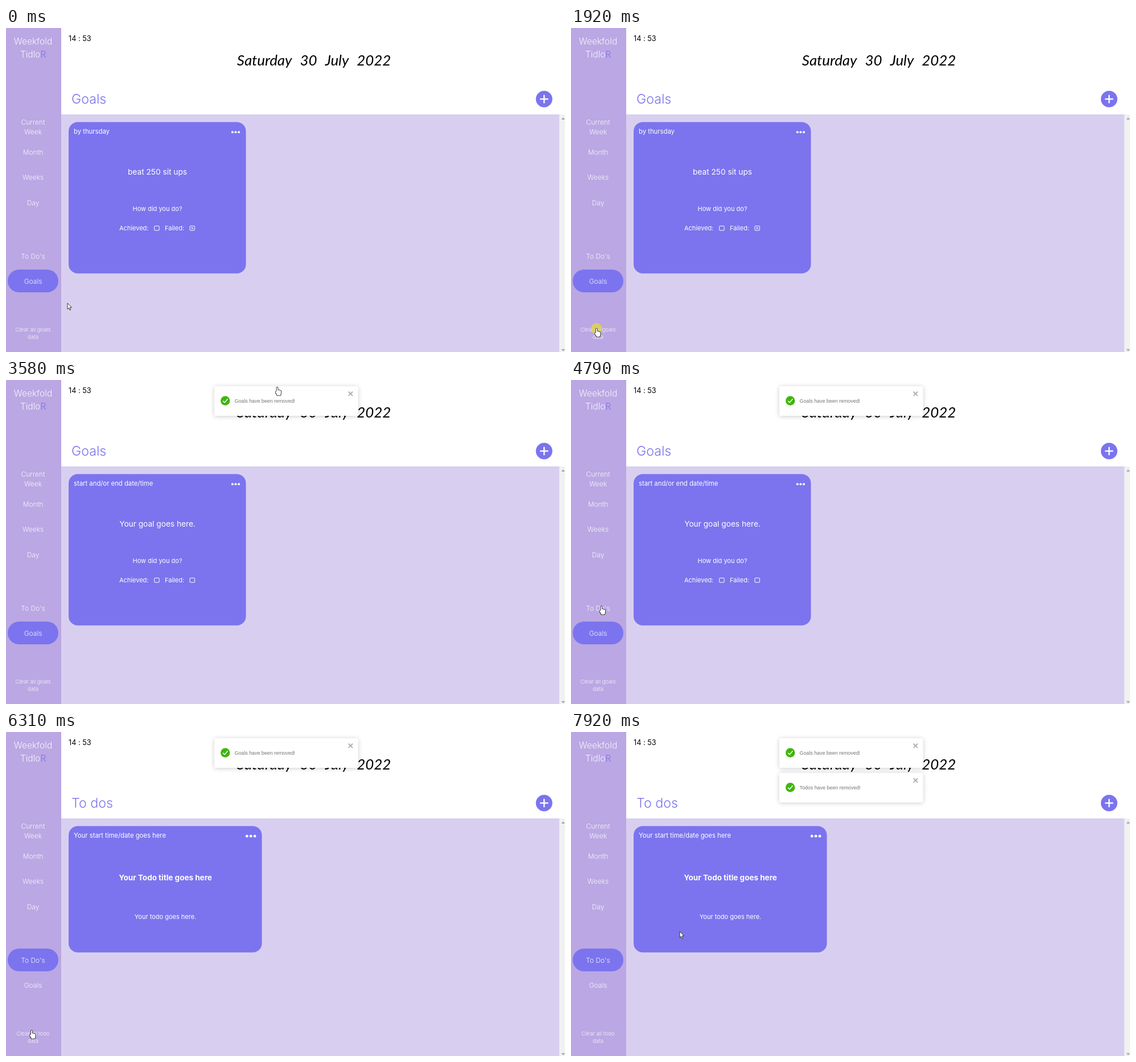
An HTML page with a canvas that plays this animation: 982x570 px, repeating every 8000 ms.

```html
<!DOCTYPE html>
<html lang="en">
<head>
<meta charset="utf-8">
<title>Goals and to dos</title>
<style>
html, body { margin: 0; width: 100%; height: 100%; overflow: hidden; background: #fff; }
canvas { display: block; }
</style>
</head>
<body>
<canvas id="stage" width="982" height="570"></canvas>
<script>
const ctx = document.getElementById('stage').getContext('2d');
const LOOP = 8000;
const ACCENT = '#7b74ee', SIDEBAR = '#baa7e3', PANEL = '#d8cff0', PALE = '#f7f3fd';
const SANS = 'Inter, sans-serif';
const TODO_PAGE = 5180;
const PRESSES = [
  { down: 1920, up: 2190 },
  { down: 5120, up: TODO_PAGE },
  { down: 6050, up: 6310 }
];
const GOALS_CLEARED = PRESSES[0].up, TODOS_CLEARED = PRESSES[2].up;
const TOASTS = [
  { start: 2530, y: 11, text: 'Goals have been removed!' },
  { start: 6450, y: 72, text: 'Todos have been removed!' }
];
// Each move glides the pointer to a stop along an arc; bend sets how far it bows out.
const HOME = { x: 108, y: 484 };
const MOVES = [
  { start: 210, end: 780, x: 5, y: 505, bend: 0.85 },
  { start: 780, end: 1050, x: 65, y: 534, bend: 0.2 },
  { start: 1110, end: 1520, x: 45, y: 529, bend: 0.5 },
  { start: 2470, end: 3310, x: 515, y: 18, bend: 0 },
  { start: 3320, end: 3580, x: 476.5, y: 13, bend: 0 },
  { start: 3650, end: 4120, x: 277, y: 255, bend: 0 },
  { start: 4140, end: 4790, x: 53.5, y: 398.5, bend: 0.15 },
  { start: 5320, end: 5910, x: 45, y: 525.5, bend: -0.6 },
  { start: 6400, end: 7050, x: 539, y: 22, bend: -0.06 },
  { start: 7200, end: 7920, x: 191, y: 351, bend: 0.13 }
];

const clamp = v => Math.max(0, Math.min(1, v));
const glide = v => (1 - Math.cos(Math.PI * v)) / 2;

function text(str, x, y, size, { weight = 400, color = '#fff', align = 'left', family = SANS, style = '' } = {}) {
  ctx.font = `${style} ${weight} ${size}px ${family}`;
  ctx.textAlign = align;
  ctx.fillStyle = color;
  ctx.fillText(str, x, y);
}

function rect(x, y, w, h, color) {
  ctx.fillStyle = color;
  ctx.fillRect(x, y, w, h);
}

function round(x, y, w, h, r, color) {
  ctx.beginPath();
  ctx.roundRect(x, y, w, h, r);
  ctx.fillStyle = color;
  ctx.fill();
}

function disc(x, y, r, color) {
  ctx.beginPath();
  ctx.arc(x, y, r, 0, Math.PI * 2);
  ctx.fillStyle = color;
  ctx.fill();
}

function line(points, color, width) {
  ctx.beginPath();
  points.forEach(([x, y]) => ctx.lineTo(x, y));
  ctx.strokeStyle = color;
  ctx.lineWidth = width;
  ctx.stroke();
}

function cross(x, y, r, color, width) {
  line([[x - r, y - r], [x + r, y + r]], color, width);
  line([[x - r, y + r], [x + r, y - r]], color, width);
}

function drawSidebar(todo) {
  const light = { weight: 300, color: PALE };
  const centered = { ...light, align: 'center' };
  const stack = (labels, y, step, size) =>
    labels.forEach((label, i) => text(label, 47.5, y + i * step, size, centered));

  rect(0, 0, 97, 570, SIDEBAR);
  text('Weekfold', 47.5, 29, 15.5, centered);
  text('Tidlo', 60.5, 52, 15.5, { ...light, align: 'right' });
  text('R', 60.5, 52, 15.5, { ...light, color: ACCENT });

  round(3, todo ? 381 : 425, 89, 40, 20, ACCENT);
  stack(['Current', 'Week'], 169.5, 17.5, 12);
  stack(['Month', 'Weeks', 'Day'], 222.5, 44.7, 12);
  stack(["To Do's", 'Goals'], 406, 44, 12);
  stack([`Clear all ${todo ? 'todo' : 'goals'}`, 'data'], 534, 13, 9.5);
}

function drawScrollArrow(y, dir) {
  ctx.beginPath();
  ctx.moveTo(975.5, y);
  ctx.lineTo(982, y);
  ctx.lineTo(978.8, y + 3.5 * dir);
  ctx.fillStyle = '#a3a3a3';
  ctx.fill();
}

function drawPage(todo) {
  rect(0, 0, 982, 570, '#fff');
  rect(97, 152, 875, 418, PANEL);
  rect(972, 152, 10, 418, '#f1f1f1');
  drawScrollArrow(161, -1);
  drawScrollArrow(565, 1);

  text('14 : 53', 110, 22.5, 12.7, { color: '#000' });
  ctx.wordSpacing = '8px';
  text('Saturday 30 July 2022', 541, 65.5, 25.8,
    { color: '#000', align: 'center', family: 'Lato, sans-serif', style: 'italic' });
  ctx.wordSpacing = '0px';

  text(todo ? 'To dos' : 'Goals', 115, 133, 23.2, { weight: 300, color: ACCENT });
  disc(945.3, 125, 14.5, ACCENT);
  line([[938, 125], [952.6, 125]], '#fff', 2.4);
  line([[945.3, 117.7], [945.3, 132.3]], '#fff', 2.4);
}

function drawCard(w, h, label, dotGap, dotSize) {
  round(110, 165.5, w, h, 16, ACCENT);
  text(label, 119, 186.3, 11.3);
  for (let i = 0; i < 3; i++) disc(110 + w - 12.5 - i * dotGap, 183.2, dotSize, '#fff');
}

function checkbox(x, checked) {
  ctx.beginPath();
  ctx.roundRect(x, 348.3, 8.4, 7.8, 1);
  ctx.strokeStyle = '#fff';
  ctx.lineWidth = 1;
  ctx.stroke();
  if (checked) cross(x + 4.2, 352.2, 1.8, '#fff', 1);
}

function drawGoal(cleared) {
  const mid = { align: 'center' };
  drawCard(311.5, 266.3, cleared ? 'start and/or end date/time' : 'by thursday', 5.6, 2);
  text(cleared ? 'Your goal goes here.' : 'beat 250 sit ups', 266, 258, 13.7, mid);
  text('How did you do?', 266, 322, 11, mid);
  text('Achieved:', 199, 356, 11);
  text('Failed:', 279, 356, 11);
  checkbox(260.7, false);
  checkbox(323, !cleared);
}

function drawTodo(cleared) {
  const title = { weight: 700, align: 'center' };
  drawCard(339.5, 222.3, cleared ? 'Your start time/date goes here' : 'Saturday', 6.9, 2.4);
  if (cleared) {
    text('Your Todo title goes here', 280, 261, 13.5, title);
    text('Your todo goes here.', 280, 329, 11, { align: 'center' });
  } else {
    text('Food shopping', 280, 257.5, 13.5, title);
    text('Remember the bananas and', 184.5, 317, 11.4);
    text('apples!', 184.5, 333, 11.4);
  }
}

function drawToast({ start, y, text: message }, t) {
  if (t < start) return;
  const p = clamp((t - start) / 600);
  const scale = 0.3 + 0.7 * (1 - (1 - p) ** 3);
  ctx.save();
  ctx.globalAlpha = clamp(p * 2);
  ctx.translate(492, y + 26);
  ctx.scale(scale, scale);
  ctx.translate(-492, -26);
  ctx.shadowColor = 'rgba(0,0,0,.2)';
  ctx.shadowBlur = 9;
  ctx.shadowOffsetY = 1;
  round(366, 0, 252.5, 52, 3, '#fff');
  ctx.shadowColor = 'transparent';
  disc(385.2, 25.5, 8.2, '#3fb60c');
  line([[381, 25.8], [384, 28.8], [389.5, 22.3]], '#fff', 1.5);
  text(message, 401.5, 28.6, 8.9, { color: '#757575', family: '"Liberation Sans", Arial, sans-serif' });
  cross(605.3, 13.2, 3.7, '#b1aea8', 1.8);
  ctx.restore();
}

function drawStatus(t) {
  if (t < 4920 || t >= 5640) return;
  round(-4, 556.5, 96.5, 20, 3, '#202124');
  text('localhost:3000/todo', 1, 568.5, 9.4, { color: '#dcdde0', family: '"Open Sans", sans-serif' });
}

function pointerAt(t) {
  let from = HOME;
  for (const to of MOVES) {
    if (t < to.start) break;
    if (t < to.end) {
      const k = glide((t - to.start) / (to.end - to.start));
      const dx = to.x - from.x, dy = to.y - from.y;
      const bow = 2 * k * (1 - k) * to.bend;
      return { x: from.x + dx * k - dy * bow, y: from.y + dy * k + dx * bow };
    }
    from = to;
  }
  return from;
}

function overLink({ x, y }, t) {
  const inside = (l, top, r, b) => x >= l && x <= r && y >= top && y <= b;
  return inside(3, 381, 92, 465) || inside(12, 512, 84, 552) ||
    TOASTS.some(o => t > o.start + 200 && inside(366, o.y, 618, o.y + 52));
}

function outline(width) {
  ctx.strokeStyle = '#222';
  ctx.lineWidth = width;
  ctx.lineJoin = 'round';
  ctx.stroke();
}

function drawHand({ x, y }) {
  ctx.beginPath();
  ctx.roundRect(x - 1, y - 0.4, 2, 10, 1);
  for (let i = 0; i < 3; i++) ctx.roundRect(x + 0.9 + i * 1.8, y + 4.6 + i * 0.5, 2, 6, 1);
  ctx.roundRect(x - 2.8, y + 6.8, 3.2, 4, 1.4);
  ctx.roundRect(x - 1, y + 7, 7.2, 7, 2);
  outline(1.7);
  ctx.fillStyle = '#fff';
  ctx.fill();
}

function drawArrow({ x, y }) {
  const shape = [[0, 0], [0, 10.6], [2.4, 8.4], [4, 12.4], [5.8, 11.6], [4.2, 7.8], [7.3, 7.5]];
  ctx.beginPath();
  shape.forEach(([dx, dy]) => ctx.lineTo(x + dx, y + dy));
  ctx.closePath();
  ctx.fillStyle = '#fff';
  ctx.fill();
  outline(0.9);
}

function draw(t) {
  const todo = t >= TODO_PAGE;
  const pointer = pointerAt(t);
  drawPage(todo);
  drawSidebar(todo);
  if (todo) drawTodo(t >= TODOS_CLEARED);
  else drawGoal(t >= GOALS_CLEARED);
  TOASTS.forEach(toast => drawToast(toast, t));
  drawStatus(t);
  if (PRESSES.some(p => t >= p.down && t < p.up))
    disc(pointer.x, pointer.y, 10, 'rgba(222,212,82,.82)');
  (overLink(pointer, t) ? drawHand : drawArrow)(pointer);
}

const began = performance.now();
function tick() {
  draw((performance.now() - began) % LOOP);
  requestAnimationFrame(tick);
}
tick();
</script>
</body>
</html>
```
